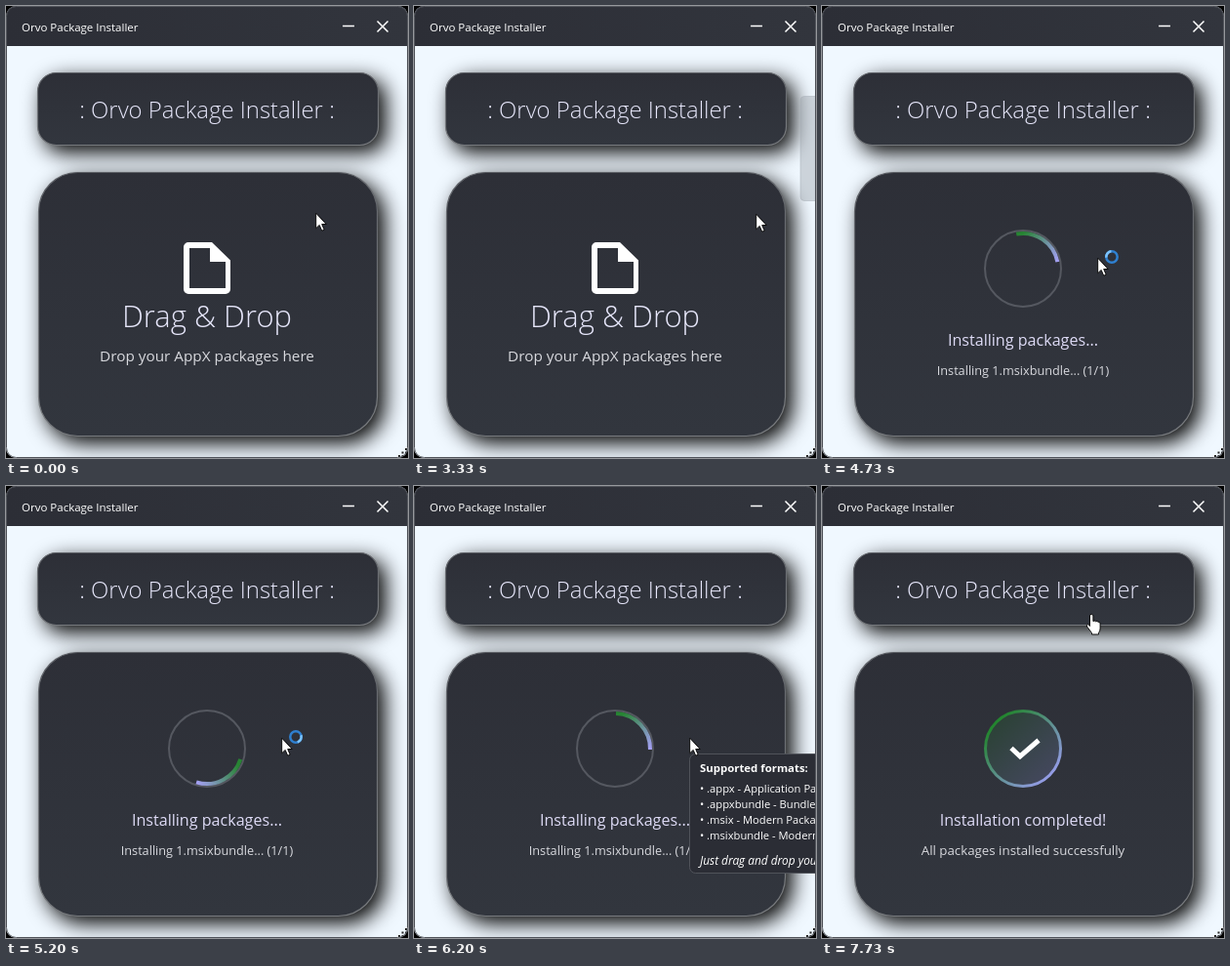
Write an HTML page that moves like this. It is 412 px wide and 463 px high and loops after 8000 ms.

```html
<!DOCTYPE html>
<html lang="en">
<head>
<meta charset="utf-8">
<title>Package installer</title>
<style>
  html, body { margin: 0; width: 100%; height: 100%; overflow: hidden; background: #000; }
  svg { display: block; width: 412px; height: 463px; }
  text { font-family: "Open Sans", "Noto Sans", sans-serif; fill: #fff; white-space: pre; }
  .mid { text-anchor: middle; }
  .light { font-weight: 350; fill: #e6e6fa; }
  .lav { fill: #dedbf6; }
  .sub { fill: #d8d9de; }
  .tip text { font-size: 11.2px; font-weight: 500; }
  .tip .head { font-size: 11.4px; font-weight: 700; }
  .tip .note { font-size: 11.9px; font-style: italic; }
</style>
</head>
<body>
<svg viewBox="0 0 412 463">
  <defs>
    <linearGradient id="bar">
      <stop stop-color="#2c2e36"/><stop offset="1" stop-color="#32353d"/>
    </linearGradient>
    <linearGradient id="panel" x2="0" y2="1">
      <stop stop-color="#2d2f37"/><stop offset="1" stop-color="#32363e"/>
    </linearGradient>
    <linearGradient id="edge" x2="0.3" y2="1">
      <stop stop-color="#5c5f65"/><stop offset="1" stop-color="#777a7e"/>
    </linearGradient>
    <linearGradient id="arcFill" gradientUnits="userSpaceOnUse" x1="0" y1="-36" x2="36" y2="0">
      <stop offset=".1" stop-color="#278433"/><stop offset="1" stop-color="#a5a0f5"/>
    </linearGradient>
    <linearGradient id="ringFill" x2="1" y2="1">
      <stop offset=".15" stop-color="#23852f"/><stop offset=".9" stop-color="#9a9df0"/>
    </linearGradient>
    <filter id="shadow" x="-20%" y="-60%" width="140%" height="220%" color-interpolation-filters="sRGB">
      <feDropShadow dx="7" dy="7" stdDeviation="10.5" flood-color="#000"/>
    </filter>
    <clipPath id="window"><rect width="412" height="463" rx="10.5"/></clipPath>
  </defs>

  <rect width="412" height="463" fill="#000"/>
  <g clip-path="url(#window)">
    <rect width="412" height="463" fill="#f0f8ff"/>

    <g fill="url(#panel)" stroke="url(#edge)" stroke-width="1.2">
      <rect x="32.5" y="68.5" width="349" height="74" rx="19" filter="url(#shadow)"/>
      <rect x="33.5" y="170.5" width="347" height="270" rx="40" filter="url(#shadow)"/>
    </g>
    <rect width="412" height="41" fill="url(#bar)"/>
    <text x="16" y="26" font-size="11.5" font-weight="500">Orvo Package Installer</text>
    <path d="M345 20.5H357M380.5 15.5L391.5 26.5M391.5 15.5L380.5 26.5" stroke="#fff" stroke-width="1.5"/>
    <text class="mid light" x="206" y="115" font-size="23.9">: Orvo Package Installer :</text>

    <g id="dropView">
      <path fill="#fff" fill-rule="evenodd" d="M187 242H211L230 260.500V290a5 5 0 0 1-5 5H187a5 5 0 0 1-5-5V247a5 5 0 0 1 5-5ZM188 248V289H225V262H209V248Z"/>
      <text class="mid light" x="206" y="329" font-size="31">Drag &amp; Drop</text>
      <text class="mid sub" x="206" y="364" font-size="15.3">Drop your AppX packages here</text>
    </g>

    <g id="busyView">
      <g transform="translate(206 269)" fill="none">
        <circle r="39" stroke="#555860" stroke-width="2"/>
        <path id="arc" d="M0-36A36 36 0 0 1 36 0" stroke="url(#arcFill)" stroke-width="4"/>
      </g>
      <text class="mid lav" x="206" y="348" font-size="16.1">Installing packages...</text>
      <text class="mid sub" x="206" y="378" font-size="12.7">Installing 1.msixbundle... (1/1)</text>
    </g>

    <g id="doneView">
      <circle cx="206" cy="269" r="38.500" fill="url(#ringFill)" fill-opacity=".2" stroke="url(#ringFill)" stroke-width="3"/>
      <path d="M194 268.500L203 277L222 260.500" fill="none" stroke="#fff" stroke-width="5"/>
      <text class="mid lav" x="206" y="348" font-size="16">Installation completed!</text>
      <text class="mid sub" x="206" y="378" font-size="13.3">All packages installed successfully</text>
    </g>

    <g id="tip" class="tip">
      <rect x="282.500" y="274.500" width="180" height="122" rx="6" fill="#2b2d35" stroke="#50535a"/>
      <text class="head" x="293" y="293">Supported formats:</text>
      <text x="293" y="314">• .appx - Application Package</text>
      <text x="293" y="330">• .appxbundle - Bundle Package</text>
      <text x="293" y="346">• .msix - Modern Package</text>
      <text x="293" y="362">• .msixbundle - Modern Bundle</text>
      <text class="note" x="293" y="388">Just drag and drop your files here</text>
    </g>

    <rect id="ghost" x="396" y="92.500" width="30" height="107" rx="4" fill="#98a0a8" fill-opacity=".42" stroke="#a8b0b8" stroke-opacity=".5"/>
    <path d="M410 453v9M406.500 456.500v6M403 460v2" stroke="#222" stroke-width="2" stroke-dasharray="2 1.5"/>
    <rect x=".5" y=".5" width="411" height="462" rx="10" fill="none" stroke="#50535a"/>
  </g>

  <g id="cursor">
    <path id="arrow" transform="translate(-.8 -.8)" d="M.5 0V15.500L4 12.200L6.500 18L9 17L6.500 11.300H11Z" fill="#fff" stroke="#000" stroke-width=".9"/>
    <rect id="badge" x="4.500" y="14.500" width="10" height="9" fill="none" stroke="#000" stroke-dasharray="1 1"/>
    <g id="wait" transform="translate(14 -2)" fill="none" stroke-width="2.500">
      <circle r="5.700" stroke="#2f80d0"/>
      <path id="waitArc" d="M0-5.700A5.700 5.700 0 0 1 5.700 0" stroke="#7cc4ff"/>
    </g>
    <path id="hand" d="M3.500 12.500V2a1.700 1.700 0 0 1 3.400 0V7.500q1.500-1 2.700.3q1.400-.8 2.500.5q2-.3 2 1.700V15q0 2.500-1.600 4.500V21H5.500V19.500L.6 13q-.8-1.700.7-2.200q1-.2 2.200 1.700Z" fill="#fff" stroke="#000" stroke-width=".9"/>
  </g>
</svg>
<script>
const LOOP = 8000, STEP = 1000 / 15;
const DROP = 4600, DONE = 6530;
const el = Object.fromEntries([...document.querySelectorAll("[id]")].map(e => [e.id, e]));

// Pointer path: time, x, y
const path = [
  [0, 318, 213], [333, 318, 213], [400, 322, 211.5],
  [3333, 351, 214], [3733, 316, 227], [4000, 316, 227],
  [4333, 290, 253], [4467, 283, 259], [6733, 283, 259],
  [6867, 245, 283], [7067, 165, 336], [7200, 105, 322],
  [7333, 128, 255], [7467, 205, 178], [7600, 268, 135], [7733, 270.5, 130.5]
];

const within = (t, from, to) => t >= from && t < to;
const clamp = v => Math.max(0, Math.min(1, v));
const show = (node, on) => node.setAttribute("display", on ? "inline" : "none");
const spin = (node, deg) => node.setAttribute("transform", `rotate(${deg})`);

function pointerAt(t) {
  const i = path.findIndex(p => p[0] > t);
  if (i < 0) return path[path.length - 1].slice(1);
  const [a, b] = [path[i - 1], path[i]];
  const k = (t - a[0]) / (b[0] - a[0]);
  return [a[1] + (b[1] - a[1]) * k, a[2] + (b[2] - a[2]) * k];
}

function render(time) {
  // The screen refreshes fifteen times a second
  const t = Math.floor((time + 4) / STEP) * STEP + 0.5;
  const [x, y] = pointerAt(t);
  const onLink = t > 7500 && y < 143;

  show(el.dropView, t < DROP);
  show(el.busyView, within(t, DROP, DONE));
  show(el.doneView, t >= DONE);
  spin(el.arc, (t - 6194) * 0.254);

  show(el.tip, within(t, 5660, 7520));
  el.tip.setAttribute("opacity", clamp((t - 5600) / 200));

  show(el.ghost, within(t, 3320, 3530));
  el.ghost.setAttribute("opacity", clamp(1 - (t - 3334) / 200));

  show(el.cursor, !within(t, 460, 3320));
  el.cursor.setAttribute("transform", `translate(${Math.round(x)} ${Math.round(y)})`);
  show(el.arrow, !onLink);
  show(el.hand, onLink);
  show(el.badge, within(t, 3390, DROP));
  show(el.wait, within(t, DROP, 5600));
  spin(el.waitArc, t * 0.36);
}

const start = performance.now();
function frame() {
  render((performance.now() - start) % LOOP);
  requestAnimationFrame(frame);
}
frame();
</script>
</body>
</html>
```
